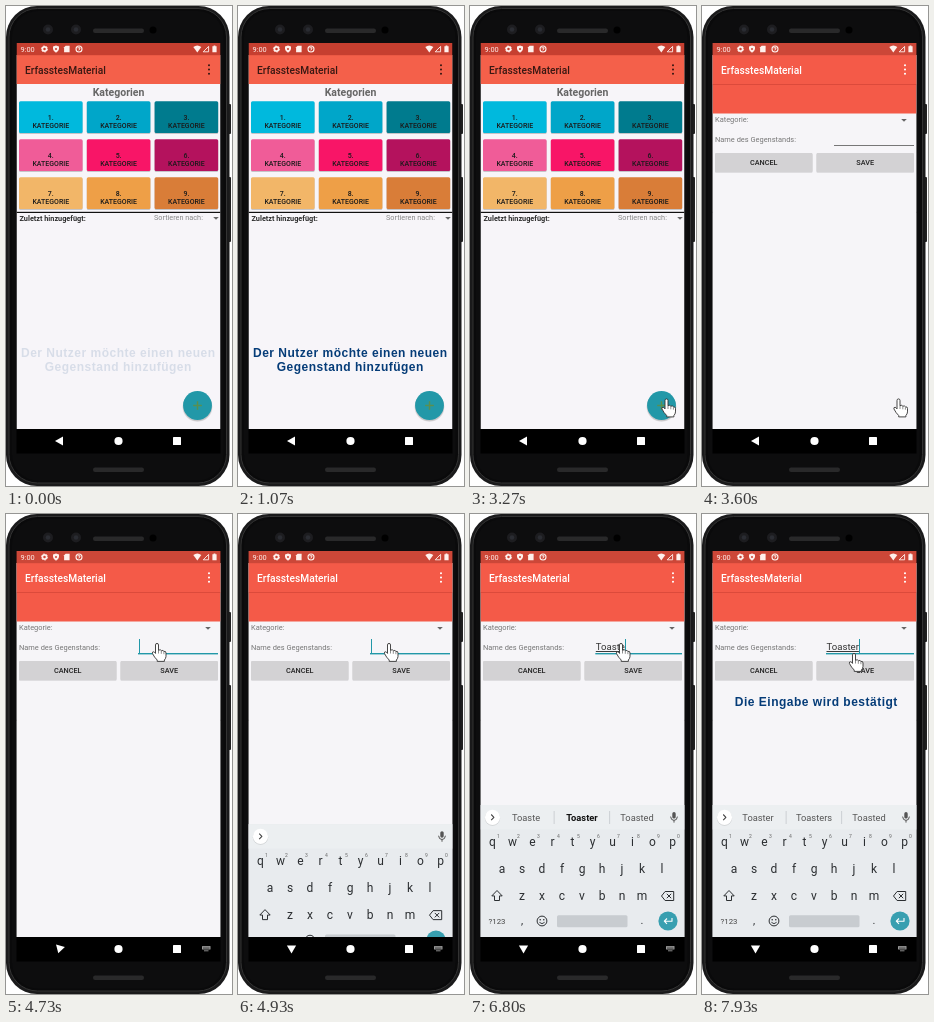
An HTML page that plays this animation: 226 by 480 pixels, repeating every 8000 ms.

```html
<!DOCTYPE html>
<html lang="de">
<head>
<meta charset="utf-8">
<title>Gegenstand hinzufügen</title>
<style>
  html, body { margin: 0; width: 100%; height: 100%; overflow: hidden; background: #fff; }
  svg { display: block; width: 226px; height: 480px; font-family: Roboto, "Noto Sans", sans-serif; }
  .caption { font: bold 12px "Liberation Sans", Arial, sans-serif; letter-spacing: .5px; fill: #053c78; }
</style>
</head>
<body>
<svg id="stage" viewBox="0 0 226 480"></svg>
<script>
const TEAL = '#2298a8';
const LOOP = 8000;
const WORD = 'Toaster';

const rect = (x, y, w, h, fill, more = '') =>
  `<rect x="${x}" y="${y}" width="${w}" height="${h}" fill="${fill}" ${more}/>`;
const disc = (x, y, r, fill, more = '') =>
  `<circle cx="${x}" cy="${y}" r="${r}" fill="${fill}" ${more}/>`;
const path = (d, fill, more = '') => `<path d="${d}" fill="${fill}" ${more}/>`;
const line = (d, color, width = 1) =>
  path(d, 'none', `stroke="${color}" stroke-width="${width}" stroke-linejoin="round"`);
const label = (x, y, size, str, fill, more = '') =>
  `<text x="${x}" y="${y}" font-size="${size}" fill="${fill}" ${more}>${str}</text>`;
const mid = (x, y, size, str, fill, more = '') =>
  label(x, y, size, str, fill, 'text-anchor="middle" ' + more);
const group = (id, body, more = '') => `<g id="${id}" ${more}>${body}</g>`;
const arrowDown = (x, y) => path(`M${x - 2.8} ${y}h5.6l-2.8 2.8z`, '#666');
// A full-width band of the phone's screen.
const band = (y, h, fill, more) => rect(10.5, y, 204, h, fill, more);

function phone() {
  return rect(222, 98, 3, 30, '#222', 'rx="1"') + rect(222, 171, 3, 65, '#222', 'rx="1"') +
    rect(0, 0, 223.5, 480, '#1a1a1b', 'rx="31"') +
    rect(3, 2.5, 217.5, 474.5, '#0a0a0b', 'rx="28.5" stroke="#333" stroke-width="1"') +
    rect(6, 5, 211.5, 469.5, '#0d0d0e', 'rx="26"') +
    [42, 70].map(x => disc(x, 23.5, 5, '#1d1d20') + disc(x, 23.5, 2.3, '#2a2c32')).join('') +
    disc(147, 24, 3.5, '#000') +
    [22.5, 461.5].map(y => rect(87, y, 51, 4.5, '#29292a', 'rx="2.2"')).join('');
}

function statusBar(fill) {
  const white = '#fff0ec';
  return band(37, 12.2, fill) +
    label(14.5, 46, 7.4, '9:00', white) +
    disc(38.5, 43, 2.1, 'none', `stroke="${white}" stroke-width="1.7"`) +
    disc(38.5, 43, 3.1, 'none', `stroke="${white}" stroke-width=".8" stroke-dasharray="1.6"`) +
    path('M50 39.5l3 1v2.6q-.4 2.4-3 3.6q-2.6-1.2-3-3.6v-2.6z', white) + disc(50, 43, 1, fill) +
    path('M59.6 39.7h4v6.6h-5.5v-5z', white) +
    disc(73, 43, 3, 'none', `stroke="${white}" stroke-width="1.1"`) + line('M71.4 41.8h2.8l-1.4 2.6', white) +
    path('M187.3 41q4-3 8 0l-4 5.5z', white) + line('M202.6 40.4v5.4h-5.4z', white, .9) +
    path('M206.4 40.3h1.2v-.8h1.8v.8h1.2v6h-4.2z', white);
}

const toolbar = color =>
  label(19, 67.6, 10.2, 'ErfasstesMaterial', color, 'font-weight="500"') +
  [59.3, 63.5, 67.7].map(y => disc(203, y, 1.05, color)).join('');

function home() {
  const colors = ['#00b9dd', '#00a6c9', '#007b8e', '#f05c98', '#f81567',
                  '#b4125d', '#f2b668', '#ee9f47', '#d97d38'];
  const tiles = colors.map((c, i) => {
    const x = 13 + i % 3 * 67.8, y = 95.3 + Math.floor(i / 3) * 38;
    return rect(x, y + .8, 63.6, 32, '#0003', 'rx="1.5"') + rect(x, y, 63.6, 31.8, c, 'rx="1.5"') +
      mid(x + 31.8, y + 18.3, 7, `${i + 1}.`, '#1a1a1a', 'font-weight="500"') +
      mid(x + 31.8, y + 27, 7, 'KATEGORIE', '#1a1a1a', 'font-weight="500"');
  }).join('');
  return band(49, 374, '#f7f5f9') + band(49, 29, '#f4604a') +
    statusBar('#c63f30') + toolbar('#3a1813') +
    mid(112.5, 90, 10.5, 'Kategorien', '#666', 'font-weight="700"') + tiles +
    band(205.8, 1.2, '#111') +
    label(13.5, 215, 7.3, 'Zuletzt hinzugefügt:', '#2c2c2c', 'font-weight="700"') +
    label(148, 214, 7.3, 'Sortieren nach:', '#888') + arrowDown(210, 211) +
    disc(191.5, 401, 15, '#0001') + disc(191.5, 400.5, 14.7, '#0002') +
    disc(191.5, 399.5, 14.4, TEAL) + line('M187.2 399.5h8.6M191.5 395.2v8.6', '#5a8f4f', 1.5);
}

function form() {
  const button = (x, w, str) => rect(x, 147.8, w, 19, '#0002', 'rx="1"') +
    rect(x, 147, w, 19, '#d3d2d4', 'rx="1"') +
    mid(x + w / 2, 159.4, 7.3, str, '#222', 'font-weight="500"');
  return band(49, 374, '#f6f5f8') + band(49, 58.5, '#f45a48') +
    band(78, 1, '#dc4a3b') + statusBar('#cc4738') + toolbar('#fff') +
    label(13, 116, 7.45, 'Kategorie:', '#777') + arrowDown(202, 113) +
    label(13, 135.5, 7.45, 'Name des Gegenstands:', '#777') +
    button(13, 97.5, 'CANCEL') + button(114.5, 97.5, 'SAVE') +
    rect(132, 139, 80, 1, '#777', 'id="underline"') +
    label(133, 136, 9.6, '', '#333', 'id="typed" text-decoration="underline"') +
    rect(133, 125, 1, 14, TEAL, 'id="caret"');
}

function keyboard() {
  const ink = '#2b2e31';
  const row = (keys, x, y) => [...keys].map((k, i) => mid(x + i * 20, y, 12, k, ink)).join('');
  const digits = [...'1234567890'].map((d, i) => mid(28.5 + i * 20, 324, 5, d, '#666')).join('');
  return band(291, 132, '#e8ebee') + band(291, 24.5, '#eceff1') +
    disc(22.5, 304, 7.7, '#0002') + disc(22.5, 303.3, 7.6, '#fff') +
    line('M21.2 300.5l2.7 2.8l-2.7 2.8', '#444', 1.1) +
    group('words', [56, 112, 167].map(x => mid(x, 306.7, 9.3, '', '#555')).join('') +
      rect(83.7, 297, .8, 13, '#c4c8cc') + rect(139.3, 297, .8, 13, '#c4c8cc')) +
    rect(202.3, 298, 3.4, 6.6, '#555', 'rx="1.7"') +
    line('M200.6 302.6q.3 3.8 3.4 3.8t3.4-3.8M204 306.4v2.2', '#555') +
    row('qwertyuiop', 22.5, 332) + digits + row('asdfghjkl', 32, 359) + row('zxcvbnm', 52, 385.5) +
    line('M27 376.5l5.2 5.4h-2.7v4.6h-5v-4.6h-2.7z', ink) +
    line('M191.5 382l3.6-4.5h8.6v9h-8.6zM196.8 379.8l4.4 4.4M201.2 379.8l-4.4 4.4', ink) +
    mid(27, 410, 7.8, '?123', '#444') + mid(52, 410, 11, ',', ink) + mid(172, 410, 11, '.', ink) +
    disc(72, 407, 4.9, 'none', `stroke="${ink}"`) + disc(70.2, 405.7, .8, ink) +
    disc(73.8, 405.7, .8, ink) + line('M69.4 408.3q2.6 2.8 5.2 0', ink, .9) +
    rect(87, 401.3, 70.5, 12, '#c8ccd0', 'rx="1.5"') + disc(198, 407, 9.6, '#389fb0') +
    line('M202 404v3.2h-7.5M197 404.5l-2.7 2.7l2.7 2.7', '#fff', 1.1);
}

function navBar() {
  return band(423, 24.5, '#000') +
    group('back', path('M49 435l8-4.6v9.2z', '#fff')) + disc(112.5, 435, 4.1, '#fff') +
    rect(167, 431, 8, 8, '#fff', 'rx=".6"') +
    group('imeIcon', rect(196, 432, 8.5, 3.6, '#999', 'rx=".6"') +
      line('M197 433.2h6.5M197 434.6h6.5', '#222', .5) + line('M198 436.8h4.5', '#999', .9));
}

// Drawn with the fingertip at the origin.
const hand = path('M-1.5 1q0-1.6 1.5-1.6t1.5 1.6v5.2q2.2-1.1 2.8.5q2-.8 2.6.7q2.1-.5 2.1 1.6v3.4' +
  'q-.2 2.2-1.6 3.6v1.4h-7.2v-1.4q-2.7-2.4-4.8-6.6q-.3-1.8 1.3-1.6q.9.3 1.8 1.6z',
  '#fff', 'stroke="#333" stroke-width=".9" stroke-linejoin="round"') +
  line('M1.5 6v3.5M4.3 7v2.8M6.9 8v2.2', '#444', .6);

document.getElementById('stage').innerHTML =
  '<clipPath id="screen"><rect x="10.5" y="37" width="204" height="386"/></clipPath>' + phone() +
  `<g clip-path="url(#screen)">${home()}${group('form', form())}${group('keys', keyboard())}</g>` +
  navBar() +
  group('intro', mid(112.3, 351.3, 12, 'Der Nutzer möchte einen neuen', '') +
    mid(112.3, 365.3, 12, 'Gegenstand hinzufügen', ''), 'class="caption"') +
  group('confirm', mid(114.3, 191.8, 12, 'Die Eingabe wird bestätigt', ''), 'class="caption"') +
  group('hand', hand);

const el = Object.fromEntries([...document.querySelectorAll('[id]')].map(e => [e.id, e]));
const slots = [...el.words.querySelectorAll('text')];

const ramp = (t, from, to) => Math.min(1, Math.max(0, (t - from) / (to - from)));
const ease = p => p * p * (3 - 2 * p);
const show = (e, alpha) => e.setAttribute('opacity', alpha);
const move = (e, x, y) => e.setAttribute('transform', `translate(${x} ${y})`);

const keyTimes = [5530, 5930, 6130, 6330, 6600, 6800, 7000];
const handPath = [[2670, 196.5, 393.5], [4230, 196.5, 393.5], [4570, 151, 130],
                  [7730, 151, 130], [7930, 152, 140]];
const suggestions = [
  ['', '', ''], ['T', 'Thanks', 'Thank'], ['To', 'The', 'Too'], ['Toa', 'Toast', 'Tia'],
  ['Toas', 'Toast', 'Toasted'], ['Toast', 'Toasted', 'Toaster'],
  ['Toaste', 'Toaster', 'Toasted'], ['Toaster', 'Toasters', 'Toasted']
];

function handAt(t) {
  const i = handPath.findIndex(p => p[0] > t);
  if (i < 1) return handPath[i < 0 ? handPath.length - 1 : 0].slice(1);
  const [a, b] = [handPath[i - 1], handPath[i]];
  const p = ease(ramp(t, a[0], b[0]));
  return [a[1] + (b[1] - a[1]) * p, a[2] + (b[2] - a[2]) * p];
}

function render(t) {
  show(el.intro, Math.min(ramp(t, -60, 430), 1 - ramp(t, 2630, 3110)));
  show(el.confirm, ramp(t, 7430, 7930));

  const open = ease(ramp(t, 3330, 3560));
  show(el.form, open);
  move(el.form, 0, 24 * (1 - open));

  show(el.hand, t >= 2670 ? 1 : 0);
  move(el.hand, ...handAt(t));

  const focused = t >= 4600;
  const count = keyTimes.filter(k => t >= k).length;
  const left = 132 - 8 * Math.max(0, count - 1) / 6;
  el.underline.setAttribute('x', left);
  el.underline.setAttribute('width', 212 - left);
  el.underline.setAttribute('height', focused ? 1.4 : 1);
  el.underline.setAttribute('fill', focused ? TEAL : '#777');
  el.typed.setAttribute('x', left + .5);
  el.typed.textContent = WORD.slice(0, count);
  const width = count ? el.typed.getComputedTextLength() : 0;
  el.caret.setAttribute('x', Math.round(left + .6 + width));
  const lastKey = count ? keyTimes[count - 1] : 4600;
  show(el.caret, focused && (t - lastKey) % 930 < 465 ? 1 : 0);

  const lift = ramp(t, 4770, 5030);
  move(el.keys, 0, 132 * (1 - lift) ** 2);
  el.back.setAttribute('transform', `rotate(${-90 * ease(ramp(t, 4610, 4775))} 53.5 435)`);
  show(el.imeIcon, ramp(t, 4600, 4680));

  show(el.words, count ? 1 : 0);
  const sure = count > 0 && count < WORD.length;
  slots.forEach((s, i) => {
    s.textContent = suggestions[count][i];
    const strong = sure && i === 1;
    s.setAttribute('font-weight', strong ? 700 : 400);
    s.setAttribute('fill', strong ? '#111' : '#555');
  });
}

const start = performance.now();
function tick() {
  render((performance.now() - start) % LOOP);
  requestAnimationFrame(tick);
}
tick();
</script>
</body>
</html>
```
